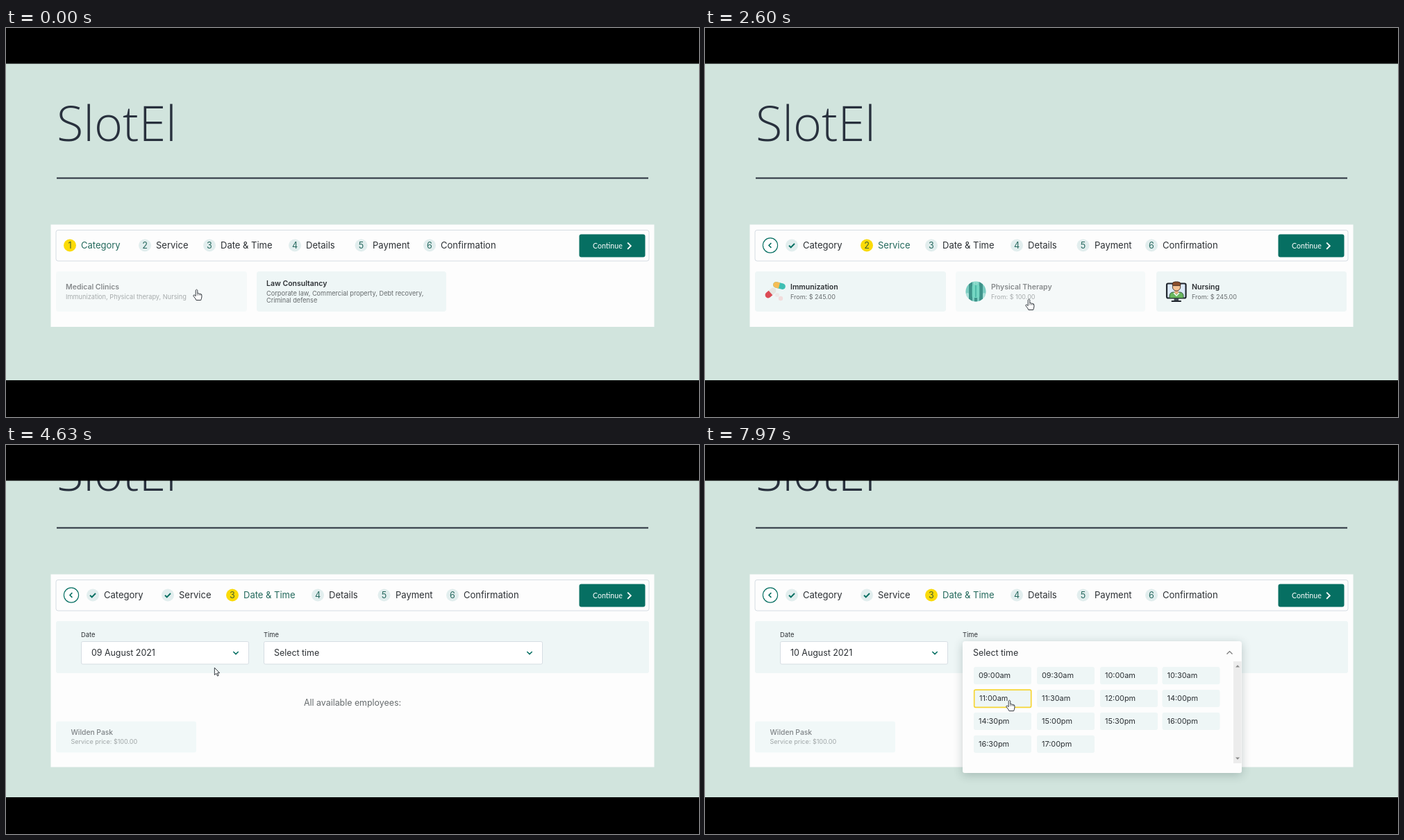
An HTML page with a canvas that plays this animation: 998 by 561 pixels, repeating every 8 s.

```html
<!DOCTYPE html>
<html lang="en">
<head>
<meta charset="utf-8">
<title>Booking steps</title>
<style>
  html, body { margin: 0; width: 100%; height: 100%; overflow: hidden; background: #000; }
  canvas { display: block; width: 998px; height: 561px; }
</style>
</head>
<body>
<canvas id="stage" width="998" height="561"></canvas>
<script>
const ctx = document.getElementById('stage').getContext('2d');
const LOOP = 8000;
const AT = { service: 400, date: 3630, calendar: 5050, pick: 5950, time: 7000 };
const SCROLL = 97;
const TEAL = '#066f62', INK = '#28303d', TEXT = '#2b2f33', GREY = '#666b6d';
const TINT = '#eef6f6', YELLOW = '#fbdb08', PAPER = '#fdfdfd', LINE = '#d6dde3';
const UI = 'Inter, "Noto Sans", sans-serif';

// Pointer keys: time, x, y of the hot spot
const PATH = [
  [0, 274.5, 377], [1250, 274.5, 377], [2300, 466.5, 391], [4150, 466.5, 391],
  [4850, 250, 300], [5230, 250, 302], [5470, 243.5, 362], [5850, 168, 438],
  [6150, 168, 438], [6600, 436.5, 304], [7250, 436.5, 304], [7700, 438.5, 368], [LOOP, 438.5, 368]
];
const STEPS = [
  ['Category', 92, 108], ['Service', 200, 216], ['Date & Time', 293, 309],
  ['Details', 416, 432], ['Payment', 511.5, 528], ['Confirmation', 610, 626]
];
const CARDS = [[72, 275], [361, 273], [650, 274]];
const SLOTS = ['09:00am', '09:30am', '10:00am', '10:30am', '11:00am', '11:30am', '12:00pm',
  '14:00pm', '14:30pm', '15:00pm', '15:30pm', '16:00pm', '16:30pm', '17:00pm'];
const SLOT_X = [387, 478, 569, 658.5];
const HAND = new Path2D('M-1.3 1.2Q0 -.8 1.3 1.2V6Q2.8 4.8 3.8 6.4Q5.2 5.4 6 7Q7.6 6.6 7.4 8.6V11Q7 13 6.2 15.5H-.6Q-1.4 13 -4.6 9.6Q-5 7.6 -3 8.2L-1.3 9.6Z');
const ARROW = new Path2D('M0 0V10.5L2.5 8.2L4.2 12L5.8 11.3L4.2 7.6H7.3Z');

const clamp = v => Math.min(1, Math.max(0, v));
const smooth = p => p * p * (3 - 2 * p);
const inside = (p, x, y, w, h) => p.x >= x && p.x <= x + w && p.y >= y && p.y <= y + h;

function pointer(t) {
  t = Math.max(0, t);
  let i = 0;
  while (i < PATH.length - 2 && t >= PATH[i + 1][0]) i++;
  const [t0, x0, y0] = PATH[i], [t1, x1, y1] = PATH[i + 1];
  const k = smooth(clamp((t - t0) / (t1 - t0)));
  return { x: x0 + (x1 - x0) * k, y: y0 + (y1 - y0) * k };
}

function scrollAt(t) {
  return SCROLL * (1 - (1 - clamp((t - 3640) / 423)) ** 3);
}

function text(s, x, y, size, color = TEXT, weight = 400, align = 'left', family = UI) {
  ctx.font = `${weight} ${size}px ${family}`;
  ctx.textAlign = align;
  ctx.fillStyle = color;
  ctx.fillText(s, x, y);
}

function box(x, y, w, h, fill, radius = 0, stroke, lineWidth = 1) {
  ctx.beginPath();
  ctx.roundRect(x, y, w, h, radius);
  if (fill) { ctx.fillStyle = fill; ctx.fill(); }
  if (stroke) { ctx.strokeStyle = stroke; ctx.lineWidth = lineWidth; ctx.stroke(); }
}

function dot(x, y, r, fill, stroke, lineWidth = 1) {
  ctx.beginPath();
  ctx.arc(x, y, r, 0, 7);
  if (fill) { ctx.fillStyle = fill; ctx.fill(); }
  if (stroke) { ctx.strokeStyle = stroke; ctx.lineWidth = lineWidth; ctx.stroke(); }
}

function line(points, color, width) {
  ctx.beginPath();
  points.forEach(([x, y]) => ctx.lineTo(x, y));
  ctx.strokeStyle = color;
  ctx.lineWidth = width;
  ctx.stroke();
}

// dx, dy point along the chevron's tip
function chevron(x, y, dx, dy, size, color, width) {
  const a = dx * size / 2, b = dy * size / 2;
  line([[x - a - dy * size, y - b - dx * size], [x + a, y + b], [x - a + dy * size, y - b + dx * size]], color, width);
}

function floating(x, y, w, h) {
  ctx.save();
  ctx.shadowColor = 'rgba(20,50,50,.24)';
  ctx.shadowBlur = 14;
  ctx.shadowOffsetY = 3;
  box(x, y, w, h, PAPER, 3);
  ctx.restore();
}

function header(active) {
  const shift = active ? 33 : 0;
  box(72, 291.5, 854, 44.5, null, 3, LINE);
  if (active) {
    dot(94, 313.5, 10.6, '#fff', TEAL, 1.1);
    chevron(93.7, 313.5, -1, 0, 3.4, TEAL, 1.5);
  }
  STEPS.forEach(([label, cx, tx], i) => {
    const x = cx + shift, on = i === active;
    dot(x, 313.5, 9, on ? YELLOW : '#e2eeee');
    if (i < active) line([[x - 4, 313.8], [x - 1.3, 316.4], [x + 4, 311]], TEAL, 2);
    else text(i + 1, x, 318, 12.6, on ? '#46622c' : '#27695f', 400, 'center');
    text(label, tx + shift, 317.6, 13, on ? '#23695c' : TEXT);
  });
  box(825.5, 297.5, 95, 33, TEAL, 3);
  text('Continue', 845, 318, 10.6, '#fff', 400, 'left', 'Lato, "Open Sans", sans-serif');
  chevron(897.5, 314.2, 1, 0, 4.6, '#fff', 1.9);
}

function capsule(x, y, angle, a, b) {
  ctx.save();
  ctx.translate(x, y);
  ctx.rotate(angle);
  box(-9, -4.3, 18, 8.6, b, 4.3);
  box(-9, -4.3, 9, 8.6, a, [4.3, 0, 0, 4.3]);
  ctx.restore();
}

const icons = [
  () => {
    capsule(94.5, 382, -.72, '#dc4b55', '#e6e5e1');
    capsule(107, 371.5, .25, '#f6bd55', '#3fbfb3');
    dot(104, 385, 3, '#eee8e8');
    dot(109, 390, 3.2, '#f2dcdc');
  },
  () => {
    ctx.save();
    ctx.beginPath();
    ctx.arc(390, 380, 14.6, 0, 7);
    ctx.clip();
    box(375, 365, 30, 30, '#19a894');
    box(380, 364, 5, 34, '#0d655e', 3);
    box(395, 364, 5, 34, '#0d655e', 3);
    box(384.5, 370, 11, 20, '#6fe0c5', 4);
    line([[390, 367], [390, 388]], '#12877a', 1.3);
    dot(390, 368, 3, '#a7eeda');
    box(376, 382, 4, 14, '#d4f3ed', 2);
    box(400, 382, 4, 14, '#d4f3ed', 2);
    box(388, 389, 4, 7, '#0d655e');
    ctx.restore();
  },
  () => {
    box(665, 368.5, 27.5, 21, '#dceafa', 2, '#20262e', 2.2);
    box(675.5, 390, 6.5, 4, '#444d58');
    box(671.5, 393, 14.5, 2, '#20262e', 1);
    box(669, 381, 20, 8.5, '#69b85f', [5, 5, 0, 0], '#25432f', .8);
    box(676.3, 378, 5.4, 5.5, '#eeb184', 2);
    dot(679, 373.5, 5.7, '#f6c394', '#3b2a22', .9);
    box(673, 366, 12, 5.6, '#8c4f2c', [5, 5, 2, 2], '#3b2a22', .9);
    line([[675, 382], [679, 386], [683, 382]], '#fff', 1.4);
  }
];

// Share of the last 200 ms spent over a card gives its fade
function hover(t, x, w) {
  let n = 0;
  for (let i = 0; i < 10; i++) if (inside(pointer(t - i * 20), x, 351, w, 58)) n++;
  return n / 10;
}

function card(i, t, content) {
  const [x, w] = CARDS[i];
  ctx.globalAlpha = 1 - .45 * hover(t, x, w);
  box(x, 351, w, 58, TINT, 4);
  content(x);
  ctx.globalAlpha = 1;
}

function categories(t) {
  card(0, t, () => {
    text('Medical Clinics', 86, 377.3, 10.5, TEXT, 600);
    text('Immunization, Physical therapy, Nursing', 86, 391, 9.2, GREY);
  });
  card(1, t, () => {
    text('Law Consultancy', 375, 372.3, 10.5, TEXT, 600);
    text('Corporate law, Commercial property, Debt recovery,', 375, 386, 9.2, GREY);
    text('Criminal defense', 375, 396, 9.2, GREY);
  });
}

function services(t) {
  [['Immunization', 245], ['Physical Therapy', 100], ['Nursing', 245]].forEach(([name, price], i) => {
    card(i, t, x => {
      icons[i]();
      text(name, x + 51, 377.3, 10.5, TEXT, 600);
      text(`From: $ ${price}.00`, x + 51, 391, 9, GREY);
    });
  });
}

function field(x, w, value) {
  box(x + .5, 380.5, w, 32.5, '#fff', 2, LINE);
  text(value, x + 15, 400.7, 12.4);
  chevron(x + w - 18, 396.8, 0, 1, 3.7, TEAL, 1.5);
}

function calendar(value, picked) {
  floating(108, 380, 241.5, 255);
  text(value, 122.5, 400.7, 12.4);
  chevron(331.5, 396.5, 0, -1, 4, '#777', 1.2);
  box(124, 416.7, 209, 22, TEAL);
  box(146, 416.7, 1.2, 22, '#fff');
  box(310, 416.7, 1.2, 22, '#fff');
  chevron(134.7, 427.7, -1, 0, 3.2, '#fff', 1.4);
  chevron(322.3, 427.7, 1, 0, 3.2, '#fff', 1.4);
  text('AUGUST', 228.5, 431.5, 10.5, YELLOW, 700, 'center');
  ['Mon', 'Tue', 'Wed', 'Thu', 'Fri', 'Sat', 'Sun'].forEach((d, i) =>
    text(d, 139 + i * 29.9, 456.3, 9.3, '#5c6163', 400, 'center'));
  for (let i = 0; i < 35; i++) {
    const x = 139.2 + i % 7 * 30, y = 478 + Math.floor(i / 7) * 30;
    const day = i < 6 ? 26 + i : i - 5, past = i < 14;
    box(x - 14.5, y - 14.5, 29, 29, past ? '#f4f9f9' : '#e9f4f3');
    if (!past && day === picked) box(x - 14, y - 14, 28, 28, '#fdf5d4', 1, '#f4d43c', 1.6);
    text(day, x, y + 3.5, 9.4, past ? '#9bcac2' : '#176457', past ? 500 : 700, 'center');
  }
}

function slotRect(i) {
  return [SLOT_X[i % 4], 417 + Math.floor(i / 4) * 32.9, 83, 25.2];
}

function times(p) {
  floating(371, 380, 402, 190);
  text('Select time', 386, 400.7, 12.4);
  chevron(755.5, 396.5, 0, -1, 4, '#777', 1.2);
  SLOTS.forEach((label, i) => {
    const [x, y, w, h] = slotRect(i);
    const on = inside(p, x, y, w, h);
    box(x, y, w, h, TINT, 3);
    if (on) box(x + .7, y + .2, w - 1, h, TINT, 2, '#f6d636', 1.7);
    text(label, x + (on ? 8 : 7), y + 15.8, 10.9);
  });
  box(761, 409, 11.5, 147, '#ececec');
  for (const [y, d] of [[416, -1], [549, 1]]) {
    ctx.beginPath();
    ctx.moveTo(764, y - d * 1.5);
    ctx.lineTo(770, y - d * 1.5);
    ctx.lineTo(767, y + d * 1.8);
    ctx.fillStyle = '#8b8b8b';
    ctx.fill();
  }
}

function dateTime(t, p) {
  const picked = t < AT.pick ? 9 : 10;
  const value = `${String(picked).padStart(2, '0')} August 2021`;
  box(72, 351, 854, 75, TINT, 3);
  text('Date', 108, 374.2, 9.3);
  text('Time', 371, 374.2, 9.3);
  field(108, 241, value);
  field(371, 401, 'Select time');
  text('All available employees:', 499, 473.3, 12.4, GREY, 400, 'center');
  ctx.globalAlpha = .58;
  box(72, 495.5, 202, 45, '#e9f4f4', 3);
  text('Wilden Pask', 93.5, 514.5, 10.3, TEXT, 500);
  text('Service price: $100.00', 93.5, 528.3, 9, GREY);
  ctx.globalAlpha = 1;
  if (t >= AT.time) times(p);
  else if (t >= AT.calendar) calendar(value, picked);
}

function clickable(t, p) {
  if (t < AT.date) return CARDS.some(([x, w]) => inside(p, x, 351, w, 58));
  if (t <= 4150) return true;
  if (inside(p, 108, 380, 241, 33) || inside(p, 371, 380, 402, 33)) return true;
  if (t >= AT.time) return SLOTS.some((_, i) => inside(p, ...slotRect(i)));
  return t >= AT.calendar && inside(p, 124, 524, 210, 90);
}

function cursor(p, hand) {
  ctx.save();
  ctx.translate(p.x, p.y);
  const shape = hand ? HAND : ARROW;
  ctx.fillStyle = '#fff';
  ctx.fill(shape);
  ctx.strokeStyle = '#343a40';
  ctx.lineWidth = 1;
  ctx.stroke(shape);
  if (hand) for (const x of [1.4, 3.8, 6]) line([[x, 6.5], [x, 8.6]], '#343a40', .8);
  ctx.restore();
}

function draw(t) {
  const screen = pointer(t), scroll = scrollAt(t);
  const page = { x: screen.x, y: screen.y + scroll };
  const step = t < AT.service ? 0 : t < AT.date ? 1 : 2;

  ctx.fillStyle = '#d1e4dd';
  ctx.fillRect(0, 0, 998, 561);
  ctx.save();
  ctx.translate(0, -scroll);
  text('SlotEl', 73, 163, 70, INK, 300, 'left', '"Open Sans", "Noto Sans", sans-serif');
  box(73, 215.5, 852, 2.1, INK);
  box(64.5, 283.5, 869, step === 2 ? 278 : 147.5, PAPER);
  header(step);
  if (step === 0) categories(t);
  else if (step === 1) services(t);
  else dateTime(t, page);
  ctx.restore();

  cursor(screen, clickable(t, page));
  ctx.fillStyle = '#000';
  ctx.fillRect(0, 0, 998, 51.5);
  ctx.fillRect(0, 508, 998, 53);
}

const start = performance.now();
function frame() {
  draw((performance.now() - start) % LOOP);
  requestAnimationFrame(frame);
}
frame();
</script>
</body>
</html>
```
